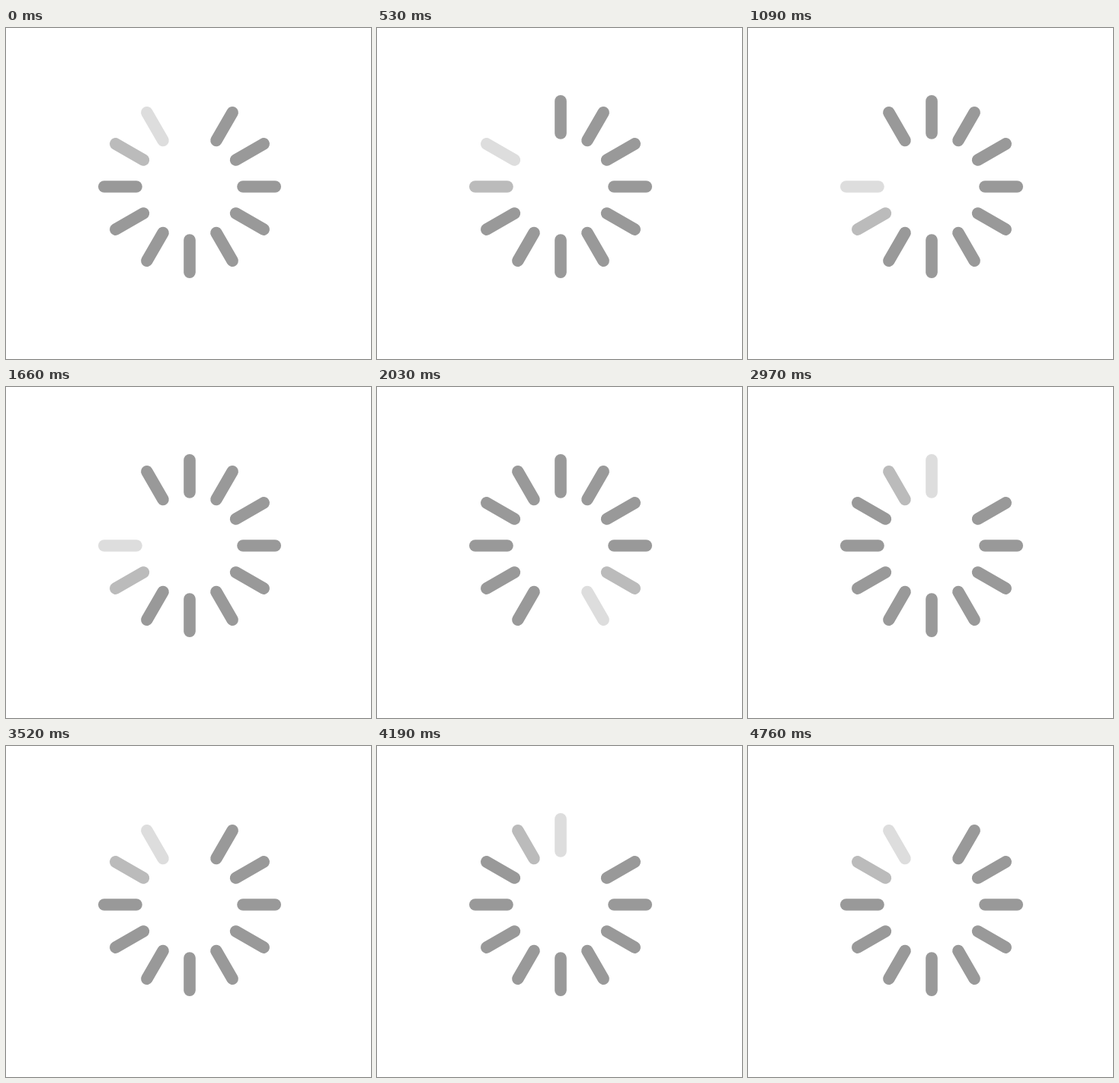
These frames come from a looping animation (479x434 px, 4.82 s). An HTML page:

```html
<!DOCTYPE html>
<html lang="en">
<head>
<meta charset="utf-8">
<title>Loading spinner</title>
<style>
  html, body { margin: 0; width: 100%; height: 100%; overflow: hidden; background: #fff; }
  svg { display: block; }
</style>
</head>
<body>
<svg width="479" height="434" viewBox="0 0 479 434">
  <g id="spokes" transform="translate(241 208)" stroke-width="15.6" stroke-linecap="round"></g>
</svg>
<script>
const LOOP = 4820, TICK = 79, LEAD = 36, LAST_TICK = 60;
const SPOKES = 12, SPOKES_PER_TICK = 1.6;
const TRAIL = ['#fff', '#ddd', '#bbb'], REST = '#999';

const group = document.getElementById('spokes');
const spokes = Array.from({ length: SPOKES }, (_, i) => {
  const line = document.createElementNS('http://www.w3.org/2000/svg', 'line');
  line.setAttribute('y1', -112.2);
  line.setAttribute('y2', -70);
  line.setAttribute('transform', `rotate(${i * 360 / SPOKES})`);
  return group.appendChild(line);
});

// The head jumps clockwise on every tick, with a fading trail behind it
function draw(ms) {
  const tick = Math.min(LAST_TICK, Math.floor((ms + LEAD) / TICK));
  const head = Math.round(tick * SPOKES_PER_TICK) % SPOKES;
  spokes.forEach((line, i) => {
    const behind = (head - i + SPOKES) % SPOKES;
    line.setAttribute('stroke', TRAIL[behind] || REST);
  });
}

const start = performance.now();
function loop() {
  draw((performance.now() - start) % LOOP);
  requestAnimationFrame(loop);
}
loop();
</script>
</body>
</html>
```
